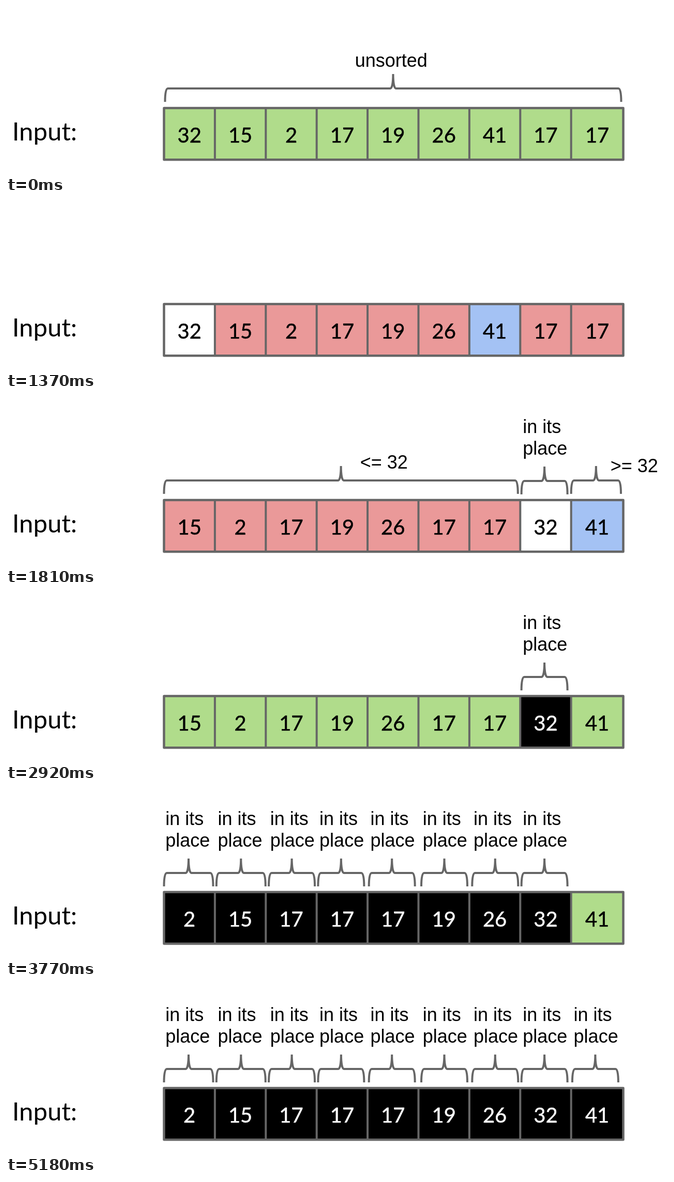
These frames come from a looping animation (1280x326 px, 6.19 s). An HTML page:

```html
<!DOCTYPE html>
<html lang="en">
<head>
<meta charset="utf-8">
<title>Partition sort</title>
<style>
  html, body { margin: 0; width: 100%; height: 100%; overflow: hidden; background: #fff; }
  svg { display: block; width: 1280px; height: 326px; }
  .num { font: 40px Lato, sans-serif; text-anchor: middle; stroke-width: .5; }
  .title { font: 49px Lato, sans-serif; }
  .label { font: 36px "Liberation Sans", Arial, sans-serif; }
  .line { fill: none; stroke: #666; stroke-width: 4; }
  .frame { stroke-width: 4.5; stroke-linejoin: round; }
</style>
</head>
<body>
<svg viewBox="0 0 1280 326"></svg>
<script>
const svg = document.querySelector('svg');
const LEFT = 305.5, STEP = 98.4, TOP = 198, RIGHT = 1193.5, BOTTOM = 298.3;
const GREEN = '#b0dc8b', RED = '#ea9999', BLUE = '#a4c2f4', WHITE = '#fff', BLACK = '#000';

const input = [32, 15, 2, 17, 19, 26, 41, 17, 17];
const [pivot, ...rest] = input;
const parted = [...rest.filter(v => v <= pivot), pivot, ...rest.filter(v => v > pivot)];
const sorted = [...input].sort((a, b) => a - b);
const pivotAt = parted.indexOf(pivot);
const count = input.length;

const edge = i => i === count ? RIGHT : LEFT + i * STEP;

function add(parent, tag, attrs, text) {
  const node = document.createElementNS('http://www.w3.org/2000/svg', tag);
  for (const key in attrs) node.setAttribute(key, attrs[key]);
  if (text !== undefined) node.textContent = text;
  parent.appendChild(node);
  return node;
}

function label(g, x, y, text) {
  add(g, 'text', { class: 'label', x, y }, text);
}

// Curly brace with its tip in the middle
function brace(g, x0, x1, bar = 160) {
  const r = 5.5, low = bar + 26, high = bar - 28, tip = (x0 + x1) / 2;
  add(g, 'path', { class: 'line', d:
    `M${x0} ${low}C${x0} ${bar + 10} ${x0 + 1.5} ${bar} ${x0 + r} ${bar}` +
    `H${tip - r}C${tip - 2} ${bar} ${tip} ${bar - 12} ${tip} ${high}` +
    `C${tip} ${bar - 12} ${tip + 2} ${bar} ${tip + r} ${bar}` +
    `H${x1 - r}C${x1 - 1.5} ${bar} ${x1} ${bar + 10} ${x1} ${low}` });
}

// Notes sit slightly to the right over every second pair of cells
function place(g, i) {
  const tip = 353 + i * 98.3 + ((i + 1) & 2 ? 3 : 0);
  const half = i < 2 ? 47.5 : 44.5;
  const x = tip - half + 2.7;
  brace(g, tip - half, tip + half, 161);
  label(g, x, 68, 'in its');
  label(g, x, 110, 'place');
}

function places(g, n) {
  for (let i = 0; i < n; i++) place(g, i);
}

function unsorted(g) {
  brace(g, LEFT + 2, RIGHT - 4);
  label(g, 674.7, 118, 'unsorted');
}

function split(g) {
  brace(g, LEFT, edge(pivotAt) - 4.5);
  label(g, 684.7, 137, `<= ${pivot}`);
  place(g, pivotAt);
  brace(g, edge(pivotAt + 1), RIGHT - 4.5);
  label(g, 1168.7, 144, `>= ${pivot}`);
}

const side = v => v === pivot ? WHITE : v < pivot ? RED : BLUE;

const steps = [
  { ms: 710, values: input, fill: () => GREEN, notes: unsorted },
  { ms: 1100, values: input, fill: side },
  { ms: 1110, values: parted, fill: side, notes: split },
  { ms: 850, values: parted, fill: v => v === pivot ? BLACK : GREEN, notes: g => place(g, pivotAt) },
  { ms: 1410, values: sorted, fill: v => v > pivot ? GREEN : BLACK, notes: g => places(g, count - 1) },
  { ms: 1010, values: sorted, fill: () => BLACK, notes: g => places(g, count) }
];
const loop = steps.reduce((sum, step) => sum + step.ms, 0);

for (const step of steps) {
  const g = step.group = add(svg, 'g', { visibility: 'hidden' });
  step.values.forEach((value, i) => {
    const x = edge(i), width = edge(i + 1) - x, fill = step.fill(value);
    const ink = fill === BLACK ? WHITE : BLACK;
    add(g, 'rect', { x, y: TOP, width, height: BOTTOM - TOP, fill });
    add(g, 'text', { class: 'num', x: x + width / 2, y: 265, fill: ink, stroke: ink }, value);
  });
  step.notes?.(g);
}

add(svg, 'text', { class: 'title', x: 12, y: 261 }, 'Input:');
add(svg, 'rect', { class: 'line frame', x: LEFT, y: TOP, width: RIGHT - LEFT, height: BOTTOM - TOP });
for (let i = 1; i < count; i++) {
  add(svg, 'path', { class: 'line', d: `M${edge(i)} ${TOP}V${BOTTOM}` });
}

let start;
function draw(now) {
  start ??= now;
  let left = (now - start) % loop;
  for (const { ms, group } of steps) {
    group.setAttribute('visibility', left >= 0 && left < ms ? 'visible' : 'hidden');
    left -= ms;
  }
  requestAnimationFrame(draw);
}
requestAnimationFrame(draw);
</script>
</body>
</html>
```
